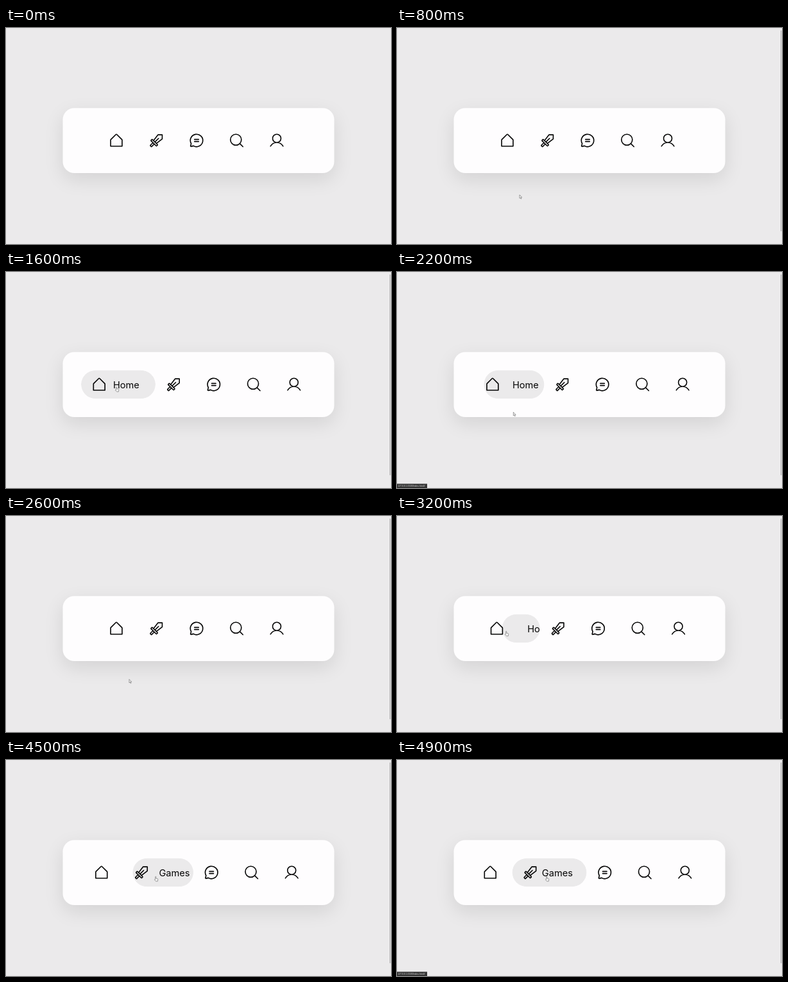
Recreate the animation shown at these times as an HTML page with a canvas. Size 600x338 px, loop 5 s.

```html
<!DOCTYPE html>
<html lang="en">
<head>
<meta charset="utf-8">
<title>Expanding navigation bar</title>
<style>
  html, body { margin: 0; width: 100%; height: 100%; overflow: hidden; background: #ebeaeb; }
  canvas { display: block; width: 600px; height: 338px; }
</style>
</head>
<body>
<canvas id="stage" width="600" height="338"></canvas>
<script>
const ctx = document.getElementById('stage').getContext('2d');
const LOOP = 5000, STEP = 100, DURATION = 400;
const GREY = '#ebeaeb';
const ITEM = { top: 153.7, height: 44.6, closed: 62.5, grow: 53.5, iconX: 28.25, labelX: 70.4 };
const MID = 176;

// Icons live in a 256-unit box and are stroked 16 units wide.
const icons = [
  'M40,216H216V120a8,8,0,0,0-2.3-5.7l-80-80a8,8,0,0,0-11.4,0l-80,80A8,8,0,0,0,40,120Z',
  'M82,130L152,40H216V104L126,174M160,96L104,152' +
    'M66.3,114.3L141.7,189.7a8,8,0,0,1,0,11.3l-8.7,8.7a8,8,0,0,1-11.3,0L46.3,134.3a8,8,0,0,1,0-11.3l8.7-8.7a8,8,0,0,1,11.3,0Z' +
    'M74,162L36.3,199.7a8,8,0,0,0,0,11.3l8.7,8.7a8,8,0,0,0,11.3,0L94,182',
  'M45.4,176.7A96,96,0,1,1,79.3,210.6L45.8,220.2a8,8,0,0,1-9.9-9.9ZM96,112H160M96,144H160',
  'M200,116a84,84,0,1,1-168,0a84,84,0,1,1,168,0M175.4,175.4L224,224',
  'M192,96a64,64,0,1,1-128,0a64,64,0,1,1,128,0M32,216c19.4-33.5,54.6-56,96-56s76.6,22.5,96,56'
].map(d => new Path2D(d));

const labels = ['Home', 'Games'];

const hovers = [
  { item: 0, on: 1180, off: 2150 },
  { item: 0, on: 3057, off: 3717 },
  { item: 1, on: 4270, off: Infinity }
];

const statusTimes = [[1600, 2400], [3500, 4000], [4700, 5000]];

// time, x, y of the pointer tip
const pointerPath = [
  [500, 19, 285], [650, 120, 268], [800, 191, 261], [1000, 191.5, 257.5],
  [1180, 178, 198], [1300, 171.5, 179.5], [2050, 171.5, 179.5], [2150, 176, 198],
  [2300, 192, 262], [2600, 192, 255.5], [2900, 190, 252], [3057, 174, 198],
  [3200, 169.5, 180], [3640, 169.5, 180], [3717, 180, 198], [3800, 195.5, 276],
  [4050, 198, 274], [4270, 231, 198], [4400, 232.5, 182], [5000, 232.5, 182]
];

const arrow = new Path2D('M0,0V5.5L1.3,4.4L2.2,6.4L3,6L2.2,4.1L3.8,4Z');
const hand = new Path2D('M0.2,0.6Q0.8,-0.1,1.3,0.6V3.2L3.8,3.8Q4.4,4,4.3,4.8L3.8,7.8H1.1L-1.2,5.3Q-1,4.4,0.2,5Z');

const clamp01 = v => Math.min(1, Math.max(0, v));

// cubic-bezier(.25, .1, .25, 1)
function ease(x) {
  if (x <= 0) return 0;
  if (x >= 1) return 1;
  const bezier = (u, a, b) => 3 * u * (1 - u) ** 2 * a + 3 * u * u * (1 - u) * b + u ** 3;
  let lo = 0, hi = 1;
  for (let i = 0; i < 24; i++) {
    const mid = (lo + hi) / 2;
    if (bezier(mid, .25, .25) < x) lo = mid; else hi = mid;
  }
  return bezier(lo, .1, 1);
}

function openness(item, t) {
  return hovers.reduce((open, h) => {
    if (h.item !== item || t < h.on) return open;
    return t < h.off ? ease((t - h.on) / DURATION) : 1 - ease((t - h.off) / DURATION);
  }, 0);
}

function roundRect(x, y, w, h, r) {
  ctx.beginPath();
  ctx.roundRect(x, y, w, h, r);
}

function drawCard() {
  ctx.save();
  ctx.shadowColor = 'rgba(0,0,0,.1)';
  ctx.shadowBlur = 30;
  ctx.shadowOffsetY = 10;
  ctx.fillStyle = '#fefdfe';
  roundRect(88.5, 125.2, 423, 101.8, 18);
  ctx.fill();
  ctx.restore();
}

function drawIcon(path, x) {
  ctx.save();
  ctx.translate(x, MID);
  ctx.scale(26 / 256, 26 / 256);
  ctx.translate(-128, -128);
  ctx.lineWidth = 16;
  ctx.lineCap = ctx.lineJoin = 'round';
  ctx.strokeStyle = '#050505';
  ctx.stroke(path);
  ctx.restore();
}

function drawLabel(text, x, width, open) {
  const { top, height, labelX } = ITEM, slide = 1 - open;
  ctx.save();
  roundRect(x, top, width, height, height / 2);
  ctx.clip();
  ctx.fillStyle = GREY;
  roundRect(x + width * slide, top, width, height, height / 2);
  ctx.fill();
  ctx.fillStyle = '#050505';
  ctx.font = '14.6px Inter, sans-serif';
  ctx.textAlign = 'center';
  ctx.fillText(text, x + labelX + 68 * slide, 181.5);
  ctx.restore();
}

function drawMenu(t) {
  const open = icons.map((_, i) => openness(i, t));
  const widths = open.map(p => ITEM.closed + ITEM.grow * p);
  let x = 300 - widths.reduce((a, b) => a + b) / 2;
  icons.forEach((icon, i) => {
    if (open[i] > 0) drawLabel(labels[i], x, widths[i], open[i]);
    drawIcon(icon, x + ITEM.iconX);
    x += widths[i];
  });
}

function drawStatus(t) {
  const shown = statusTimes.find(([on, off]) => t > on && t < off);
  if (!shown) return;
  ctx.save();
  ctx.globalAlpha = clamp01((t - shown[0]) / 200);
  ctx.fillStyle = '#343434';
  ctx.fillRect(0, 331.4, 47, 6.6);
  ctx.fillStyle = '#e4e4e4';
  ctx.font = '3.5px "Liberation Sans", sans-serif';
  ctx.fillText('127.0.0.1:5500/index.html#', 1.3, 336.2);
  ctx.restore();
}

function drawPointer(t) {
  const next = Math.max(1, pointerPath.findIndex(p => p[0] > t));
  const [t0, x0, y0] = pointerPath[next - 1], [t1, x1, y1] = pointerPath[next];
  const k = (t - t0) / (t1 - t0);
  const hovering = hovers.some(h => t >= h.on && t < h.off);
  ctx.save();
  ctx.translate(x0 + (x1 - x0) * k, y0 + (y1 - y0) * k);
  ctx.lineWidth = .7;
  ctx.lineJoin = 'round';
  ctx.fillStyle = '#f6f6f6';
  ctx.strokeStyle = '#777';
  const shape = hovering ? hand : arrow;
  ctx.fill(shape);
  ctx.stroke(shape);
  ctx.restore();
}

function draw(t) {
  ctx.fillStyle = GREY;
  ctx.fillRect(0, 0, 600, 338);
  drawCard();
  drawMenu(t);
  drawStatus(t);
  if (t >= 500) {
    ctx.fillStyle = '#a3a3a3';
    ctx.fillRect(598, 4, 1, 314);
    drawPointer(t);
  }
}

const start = performance.now();
function tick() {
  const t = (performance.now() - start) % LOOP;
  draw(Math.floor(t / STEP) * STEP);
  requestAnimationFrame(tick);
}
tick();
</script>
</body>
</html>
```
